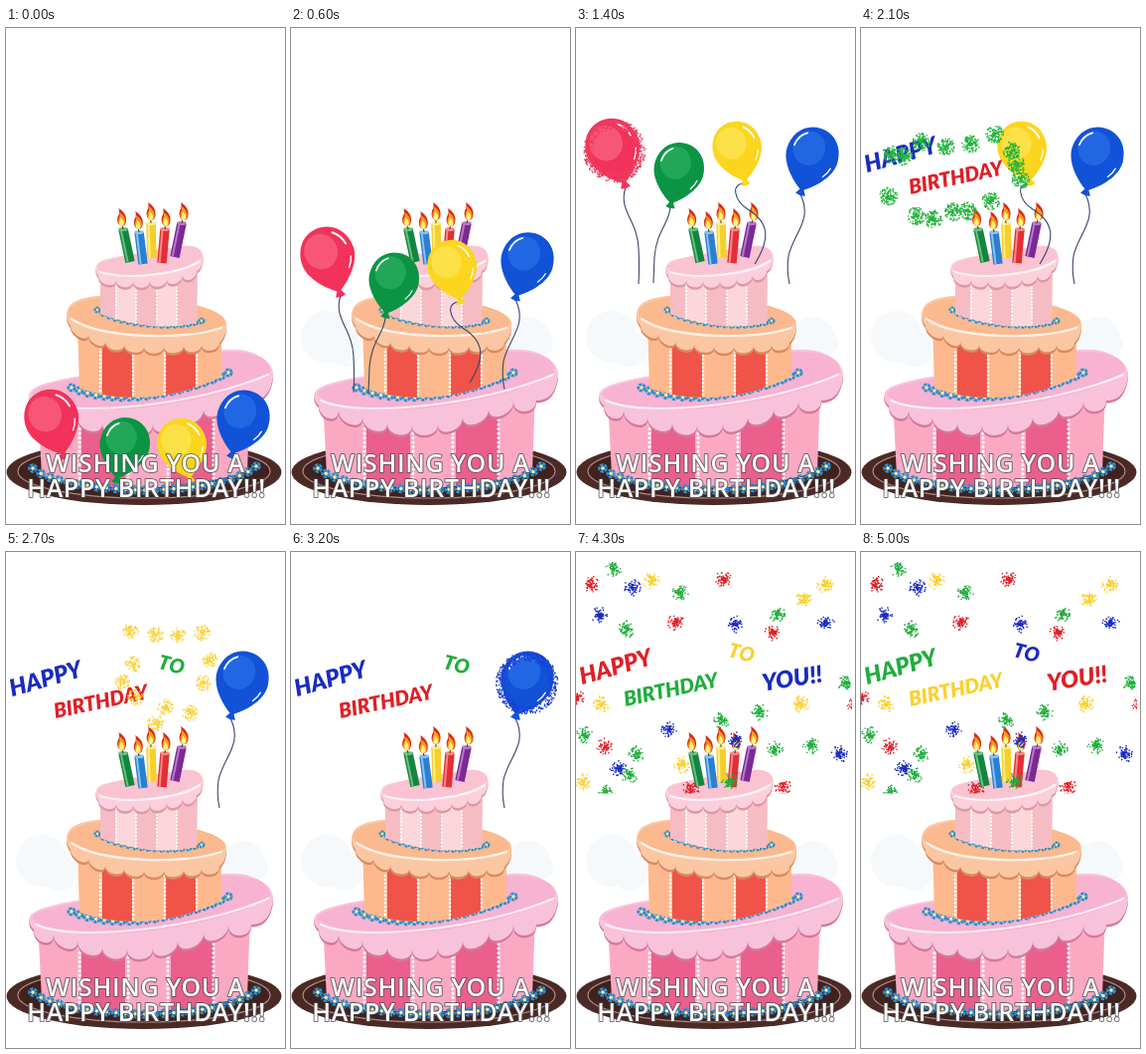
These frames come from a looping animation (281x498 px, 5100 ms). An HTML page:

```html
<!DOCTYPE html>
<html lang="en">
<head>
<meta charset="utf-8">
<title>Birthday cake</title>
<style>
html, body { margin: 0; width: 100%; height: 100%; overflow: hidden; background: #fff; }
svg { display: block; width: 100vw; height: 100vh; }
.word { font: italic 900 23px Lato, "Open Sans", sans-serif; text-anchor: middle; }
.wish { font: 600 25px "Open Sans", "Noto Sans", sans-serif; letter-spacing: .7px; text-anchor: middle;
  fill: #fff; stroke: #4a4a4a; stroke-opacity: .75; stroke-width: 2px; paint-order: stroke; stroke-linejoin: round; }
</style>
</head>
<body>
<svg id="stage" viewBox="0 0 281 498">
  <defs>
    <clipPath id="sky"><rect width="278" height="242.5"/></clipPath>
    <clipPath id="low"><path d="M32 370L36 450Q139 475 243 446L246 362Z"/></clipPath>
    <clipPath id="mid"><path d="M72 298L74 362Q145 385 217 350L217 300Z"/></clipPath>
    <clipPath id="top"><path d="M95 240L95 287Q145 306 192 296L193 236Z"/></clipPath>
  </defs>
  <g id="clouds" fill="#f5f9fb">
    <circle cx="36" cy="310" r="26"/><circle cx="54" cy="322" r="18"/>
    <circle cx="239" cy="312" r="22"/><circle cx="252" cy="317" r="12"/>
  </g>
  <g id="cake"></g>
  <g id="balloons"></g>
  <g id="words"></g>
  <g id="bursts"></g>
  <g id="confetti" clip-path="url(#sky)"></g>
  <text class="wish" x="140.5" y="446">WISHING YOU A</text>
  <text class="wish" x="141.5" y="471">HAPPY BIRTHDAY!!!</text>
</svg>
<script>
const NS = "http://www.w3.org/2000/svg";
const $ = id => document.getElementById(id);
const LOOP = 5100, STEP = 100, POP = 1200, PHASE = 600;
const RED = "#e01f26", GREEN = "#1fae3c", YELLOW = "#fbd02c", BLUE = "#1a2bc0";

function add(parent, tag, attrs) {
  const el = document.createElementNS(NS, tag);
  for (const k in attrs) el.setAttribute(k, attrs[k]);
  parent.appendChild(el);
  return el;
}
const show = (el, on) => el.setAttribute("visibility", on ? "visible" : "hidden");
const clamp = v => Math.max(0, Math.min(1, v));
const mix = (a, b, k) => a + (b - a) * k;

function random(seed) {
  let s = seed * 2654435761 >>> 0;
  return () => {
    s = s + 0x6D2B79F5 | 0;
    let v = Math.imul(s ^ s >>> 15, 1 | s);
    v = v + Math.imul(v ^ v >>> 7, 61 | v) ^ v;
    return ((v ^ v >>> 14) >>> 0) / 4294967296;
  };
}

// A speckled spot made of small squares
function clump(x, y, r, n, seed, inner = 0) {
  const rnd = random(seed);
  let d = "";
  for (let i = 0; i < n; i++) {
    const a = rnd() * Math.PI * 2, q = mix(inner, r, rnd() ** .8);
    d += `M${(x + q * Math.cos(a)).toFixed(1)} ${(y + q * Math.sin(a)).toFixed(1)}h1.4v1.4h-1.4z`;
  }
  return d;
}

/* ---------- cake ---------- */
const cake = $("cake");

function scallops(pts, drop) {
  let d = "";
  for (let i = 1; i < pts.length; i++) {
    const [a, b] = pts[i - 1], [x, y] = pts[i];
    d += `C${a} ${b + drop} ${x} ${y + drop} ${x} ${y}`;
  }
  return d;
}

function tier(o) {
  const g = add(cake, "g", { "clip-path": `url(#${o.clip})` });
  add(g, "rect", { x: 0, y: o.y, width: 281, height: o.h, fill: o.body });
  o.bands.forEach(([x, w]) => add(g, "rect", { x, y: o.y, width: w, height: o.h, fill: o.band }));
  o.beads.forEach(x => add(g, "path", { d: `M${x} ${o.y}v${o.h}`, stroke: "#fff",
    "stroke-width": o.bead, "stroke-linecap": "round", "stroke-dasharray": `.1 ${o.bead + 1.2}` }));
  const edge = o.rim + scallops(o.drips, o.drop) + "Z";
  add(cake, "path", { d: edge, fill: o.shade, transform: "translate(0 2.5)" });
  add(cake, "path", { d: edge, fill: o.icing });
  add(cake, "path", { d: o.lid, fill: o.cover });
  add(cake, "path", { d: o.shine, fill: "none", stroke: "#fff", "stroke-opacity": .75, "stroke-width": 2.2, "stroke-linecap": "round" });
}

function flowers(d, gap, s) {
  const p = add(cake, "path", { d, fill: "none" }), len = p.getTotalLength(), n = Math.round(len / gap);
  for (let i = 0; i <= n; i++) {
    const q = p.getPointAtLength(len * i / n);
    add(cake, "circle", { cx: q.x, cy: q.y, r: 2.7 * s, fill: "none", stroke: "#2f8fcd",
      "stroke-width": 3.4 * s, "stroke-dasharray": `${2.6 * s} ${.79 * s}` });
    add(cake, "circle", { cx: q.x, cy: q.y, r: 1.6 * s, fill: "#f4ee9a" });
  }
}

add(cake, "ellipse", { cx: 139, cy: 446, rx: 138.5, ry: 33, fill: "#4b2a26" });
add(cake, "ellipse", { cx: 139, cy: 445, rx: 127, ry: 27, fill: "#3f211e", stroke: "#b08a84", "stroke-width": 1.2 });

tier({
  clip: "low", y: 362, h: 110, body: "#fba9c3", band: "#ea5f8c", bands: [[76, 44], [166, 43]],
  beads: [74, 123, 163, 209], bead: 3.2,
  rim: "M28 379C22 374 21 366 28 362C50 348 130 345 178 332C210 322 230 321 245 325C266 332 272 344 268 355C265 368 258 374 247 374",
  drips: [[247, 374], [224, 375], [199, 383], [173, 391], [148, 398], [122, 399], [97, 397], [72, 391], [48, 384], [28, 379]],
  drop: 14, icing: "#f8c3da", shade: "#d5799e",
  lid: "M26 368C32 352 110 350 178 332C225 319 268 325 266 345C245 362 195 374 140 381C85 386 40 382 26 368Z",
  cover: "#f7b3d1", shine: "M30 374C70 392 195 378 264 348"
});
flowers("M27 442Q50 461 139 464Q225 462 252 440", 9.5, 1.1);
flowers("M66 361Q98 375 146 369Q195 361 224 346", 8.8, 1.05);

tier({
  clip: "mid", y: 290, h: 82, body: "#fdb98d", band: "#ef5349", bands: [[97, 30], [161, 30]],
  beads: [95, 128, 160, 192], bead: 2.6,
  rim: "M65 299C58 290 61 279 69 275C84 267 115 267 145 271C185 275 224 284 222 298C222 307 219 312 215 316",
  drips: [[215, 316], [197, 318], [179, 319], [159, 320], [139, 320], [119, 318], [100, 315], [83, 308], [65, 299]],
  drop: 9, icing: "#fbc7a2", shade: "#d98a62",
  lid: "M63 288C60 275 92 266 145 271C190 275 223 285 221 297C205 308 160 310 122 306C92 303 70 298 63 288Z",
  cover: "#fab98e", shine: "M66 292C95 312 180 314 217 301"
});
flowers("M92 283Q112 296 150 298Q178 300 197 294", 6.6, .8);

tier({
  clip: "top", y: 236, h: 66, body: "#fbd6da", band: "#f6bcc4", bands: [[95, 15], [131, 21], [172, 21]],
  beads: [111, 131, 152, 172], bead: 2.2,
  rim: "M93 249C88 242 90 236 98 233C120 227 150 224 178 219C194 217 201 226 198 234C197 240 195 243 192 244",
  drips: [[192, 244], [178, 248], [162, 252], [145, 254], [128, 254], [111, 253], [93, 249]],
  drop: 9, icing: "#fbd0da", shade: "#dc98a6",
  lid: "M92 241C90 231 130 227 178 219C195 217 200 226 197 231C184 241 158 247 131 249C110 250 97 247 92 241Z",
  cover: "#f9c3d2", shine: "M95 245C125 254 178 246 195 234"
});

function candle(x, y, bx, by, color, light) {
  const d = `M${x} ${y}L${bx} ${by}`;
  add(cake, "path", { d, stroke: color, "stroke-width": 9.5 });
  add(cake, "path", { d, stroke: light, "stroke-width": 2, transform: "translate(-2.4 0)" });
  add(cake, "ellipse", { cx: x, cy: y, rx: 4.8, ry: 2, fill: light });
  const fx = x + (x - bx) * .25;
  add(cake, "path", { d: `M${x} ${y}L${fx} ${y - 6}`, stroke: "#5b3a22", "stroke-width": 1 });
  const flame = (s, fill) => add(cake, "path", { fill, transform: `translate(${fx} ${y - 3}) scale(${s})`,
    d: "M0 0C-5 -2 -5 -8 -2.5 -12C-2 -15 -2 -16 -3 -18C3 -15 6 -9 4.5 -4C4 -1 2 0 0 0Z" });
  flame(1, "#d92a17");
  flame(.78, "#f79a1c");
  flame(.5, "#fff27a");
}
candle(146, 196, 147, 231, "#f6cf2b", "#fdee8e");
candle(118, 202, 125, 235, "#14853f", "#67c283");
candle(177, 196, 170, 230, "#7b2a94", "#b878ca");
candle(134, 205, 138, 237, "#2a7fd0", "#8cc4ef");
candle(160, 202, 157, 236, "#e22f35", "#f58a84");

/* ---------- balloons ---------- */
const balloons = [
  { from: [47, 395], to: [38, 123], tilt: -18, size: 1.05, color: "#f2325a", light: "#fb7590", dot: "#ee3f61",
    string: "M12 37C4 60 24 70 25 98Q26 118 25 134" },
  { from: [119, 421], to: [103, 145], tilt: 13, size: .97, color: "#0b9444", light: "#35b868", dot: "#22b43e",
    string: "M-8 34C-8 50 -22 58 -24 85L-25 111" },
  { from: [178, 421], to: [163, 123], tilt: -13, size: .95, color: "#fbd51e", light: "#fee96a", dot: "#fcd23a",
    string: "M8 33C-8 32 -4 50 10 59C33 73 32 90 17 114" },
  { from: [238, 395], to: [237, 131], tilt: 17, size: 1.02, color: "#1152d6", light: "#2f78f0", dot: "#1c3fd0",
    string: "M-11 36C2 62 -18 75 -23 98Q-25 112 -22 126" }
];
const skin = "M0 -31C16 -31 26 -18 26 -3C26 12 11 26 2 32L5 37Q0 39 -5 37L-2 32C-11 26 -26 12 -26 -3C-26 -18 -16 -31 0 -31Z";

balloons.forEach((b, i) => {
  b.el = add($("balloons"), "g", {});
  b.line = add(b.el, "path", { d: b.string, fill: "none", stroke: "#3b4668", "stroke-width": 1.1 });
  b.body = add(b.el, "g", {});
  add(b.body, "path", { d: skin, fill: b.color });
  add(b.body, "ellipse", { cx: -5, cy: -9, rx: 16, ry: 17, fill: b.light, opacity: .55 });
  add(b.body, "path", { d: i % 2 ? "M-20 -8Q-19 -18 -11 -23" : "M11 -23Q18 -18 20 -9",
    fill: "none", stroke: "#fff", "stroke-width": 1.8, "stroke-linecap": "round" });
  add(b.body, "path", { d: "M16 14Q20 9 21 4", fill: "none", stroke: "#fff", "stroke-width": 1.3, "stroke-linecap": "round" });
  b.dots = add($("bursts"), "path", { fill: b.dot });
});

const ring = (x, y, rx, ry, n) => Array.from({ length: n }, (_, i) => {
  const a = i / n * Math.PI * 2, k = i % 2 ? 1 : .75;
  return [x + rx * k * Math.cos(a), y + ry * k * Math.sin(a)];
});
const targets = [
  ring(42, 125, 38, 40, 12),
  [[30, 126], [27, 168], [60, 114], [85, 119], [110, 116], [134, 106], [151, 122], [156, 137], [160, 152],
   [55, 188], [72, 191], [92, 184], [107, 183], [130, 173], [42, 128]],
  [[125, 79], [150, 82], [172, 82], [197, 80], [127, 112], [205, 108], [117, 130], [130, 145], [160, 155],
   [185, 161], [150, 171], [198, 131]],
  ring(225, 128, 46, 50, 13)
];

function burst(b, i, p) {
  const [x, y] = b.to;
  if (p <= 0 || p >= 1) return "";
  if (p < .42) return clump(x, y, 27 + 13 * p, 520, 11 + i, 22);
  const k = clamp((p - .25) / .25), thin = 1 - clamp((p - .5) / .5);
  const n = (i === 1 ? 120 : 75) * (.2 + .8 * thin);
  return targets[i].map(([u, v], j) =>
    clump(mix(x, u, k), mix(y, v, k), i === 1 ? 9 : 8, n, 50 * i + j + 1)).join("");
}

/* ---------- words ---------- */
const hues = [BLUE, RED, GREEN, YELLOW];
const words = [
  ["HAPPY", 42, 135, -16, 23.5], ["BIRTHDAY", 97, 157, -12, 20.5],
  ["TO", 165, 120, 14, 20], ["YOU!!", 219, 145, -9, 23.5]
].map(([text, x, y, turn, size]) => {
  const el = add($("words"), "text", { class: "word" });
  el.style.fontSize = size + "px";
  el.textContent = text;
  return { el, x, y, turn };
});

/* ---------- confetti ---------- */
const spots = [
  [RED, [14, 32, 148, 26, 100, 70, 28, 195, 208, 235, 115, 237, 197, 80, 0, 145, 281, 154]],
  [YELLOW, [75, 28, 250, 32, 229, 47, 25, 152, 226, 152, 106, 213, 6, 230]],
  [BLUE, [56, 35, 23, 63, 160, 72, 251, 71, 93, 178, 42, 217, 265, 202, 160, 188]],
  [GREEN, [37, 17, 104, 40, 50, 77, 202, 62, 146, 168, 8, 183, 184, 160, 200, 198, 236, 194, 60, 202, 271, 132, 30, 241, 53, 223, 154, 230]]
];
const confetti = [];
spots.forEach(([fill, xy], c) => {
  for (let i = 0; i < xy.length; i += 2) {
    const g = add($("confetti"), "g", {}), seed = 300 + c * 40 + i;
    add(g, "path", { d: clump(0, 0, 8.5, 42, seed) + clump(0, 0, 5, 34, seed + 1), fill });
    confetti.push({ g, x: xy[i], y: xy[i + 1] });
  }
});

/* ---------- time ---------- */
function draw(t) {
  show($("clouds"), t >= 300);
  balloons.forEach((b, i) => {
    const p = (t - POP - i * PHASE) / PHASE;
    const x = mix(b.from[0], b.to[0], clamp(t / 600)), y = mix(b.from[1], b.to[1], clamp(t / 1000));
    b.el.setAttribute("transform", `translate(${x} ${y})`);
    show(b.el, p < .42);
    b.line.setAttribute("opacity", clamp(t / 300));
    b.body.setAttribute("transform", `rotate(${b.tilt}) scale(${b.size})`);
    b.dots.setAttribute("d", burst(b, i, p));
  });

  const lift = t >= 3400 ? -12 : 0, turn = t < 4100 ? 0 : t < 4600 ? 1 : 2;
  words.forEach((w, i) => {
    show(w.el, t >= POP + i * PHASE + 300);
    w.el.setAttribute("fill", hues[(i + turn) % 4]);
    w.el.setAttribute("transform", `translate(${w.x} ${w.y + (i < 3 ? lift : lift + 2)}) rotate(${w.turn})`);
  });

  const grow = clamp((t - 3300) / 300);
  show($("confetti"), grow > 0);
  confetti.forEach(c => c.g.setAttribute("transform", `translate(${c.x} ${c.y}) scale(${grow})`));
}

let last = -1;
function tick() {
  const t = Math.floor(performance.now() % LOOP / STEP) * STEP;
  if (t !== last) draw(last = t);
  requestAnimationFrame(tick);
}
draw(0);
tick();
</script>
</body>
</html>
```
